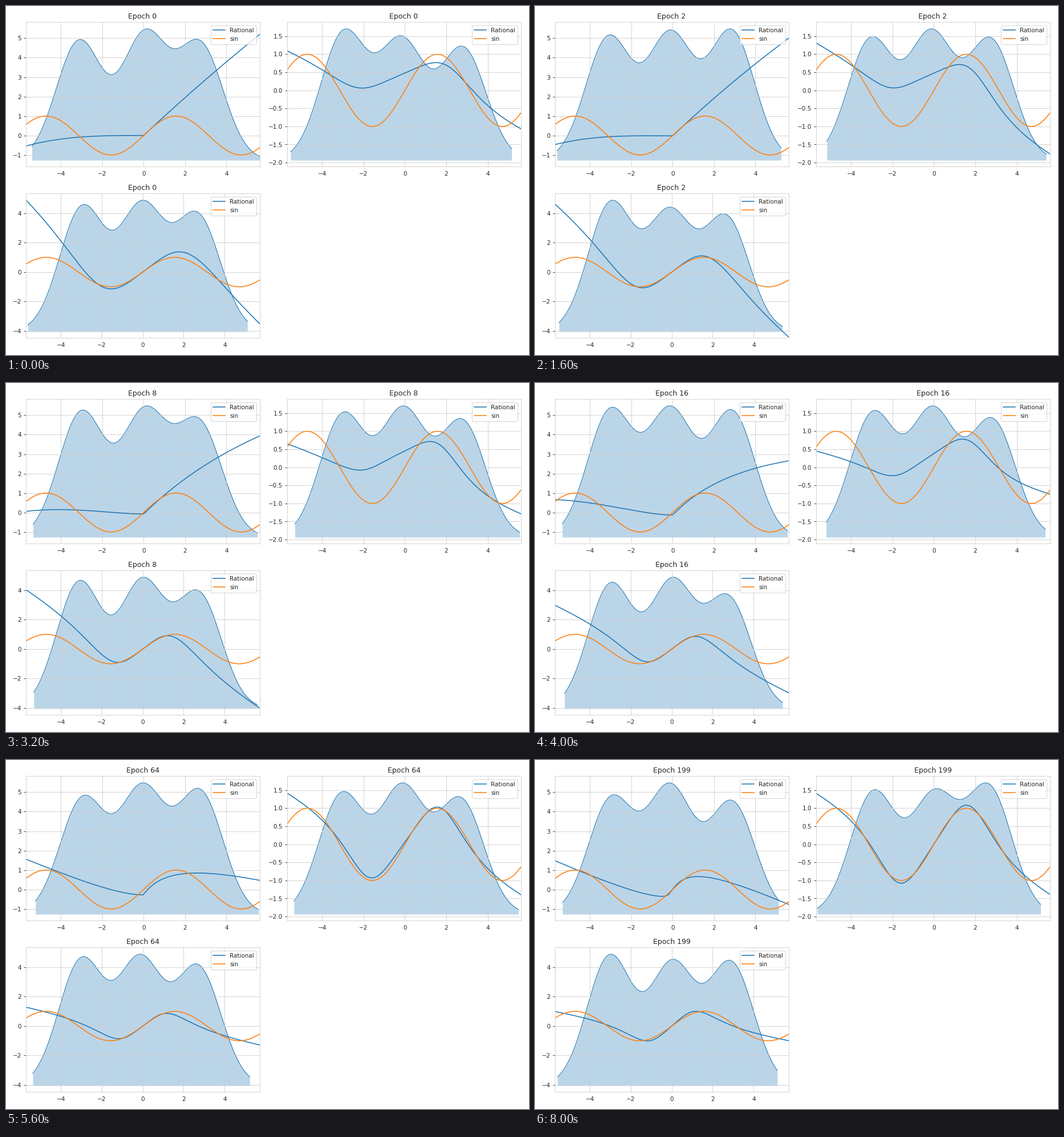
A matplotlib script that plays this animation: 917 by 611 pixels, repeating every 8800 ms.

```python
import numpy as np
import matplotlib.pyplot as plt
from matplotlib.animation import FuncAnimation

W, H, DPI = 917, 611, 75
EPOCHS = [0, 1, 2, 4, 8, 16, 32, 64, 99, 128, 199]
LAST = np.log2(200)
BLUE, ORANGE = "#1f77b4", "#ff7f0e"

plt.rcParams.update({
    "font.family": "DejaVu Sans", "font.size": 10,
    "text.color": ".15", "xtick.color": ".15", "ytick.color": ".15",
    "axes.edgecolor": ".8", "grid.color": ".8", "grid.linewidth": 0.8,
    "axes.grid": True, "axes.axisbelow": True, "xtick.bottom": False,
})


def step(p, mid, width):
    """Smooth rise from 0 to 1 around mid."""
    return 1 / (1 + np.exp((mid - p) / width))


def bump(p, mid, width):
    return np.exp(-((p - mid) / width) ** 2)


def wave(x, centre, far, slope, fall, width, power):
    """Sine-like rational: centre value and slope near 0, a falling line far out."""
    near = centre - far + (slope + fall) * x
    return far - fall * x + near / (1 + np.abs(x / width) ** power)


# Each curve depends on the training progress p = log2(1 + epoch).
def relu_curve(x, p):
    q = (p / LAST) ** 2
    shift = 0.2 * step(p, 6.9, 0.4)
    z = x + shift
    right = (z + np.hypot(z, shift)) / 2
    left = np.maximum(-x, 0)
    y = right / (1 - 0.7 * q + (0.013 + 0.33 * step(p, 4.5, 0.8)) * right)
    y += 0.52 * step(p, 3.6, 0.7) * left**2 / (left + 3)
    y -= 0.003 * step(-p, -5, 0.4) * left**3
    return y - 0.5 * q * right - 0.45 * q


def offset_curve(x, p):
    learnt = step(p, 4.9, 0.6)
    fall = np.interp(p, [0, 1, 2.3, 4.1, 6], [0.22, 0.33, 0.25, 0.12, 0.28])
    return wave(x, 0.48 * (1 - learnt), -0.4 * bump(p, 2.6, 1.6),
                0.25 + 0.65 * learnt, fall, 2.3 + 0.55 * np.exp(-p / 2), 4)


def sine_curve(x, p):
    return wave(x, 0, 0.8 * np.exp(-1.2 * p), 1.05 + 0.2 * step(p, 7, 0.3),
                0.2 + 0.8 * step(-p, -4, 0.8), 1.65 + 1.6 * step(-p, -2, 1.2), 3)


def density(rng):
    """Smoothed histogram of three noisy clusters, scaled to a peak of 1."""
    x = np.linspace(-5.4 + rng.uniform(-.25, .25), 5.25 + rng.uniform(-.3, .4), 300)
    mean = np.array([-3.03, -.05, 2.8]) + rng.uniform(-.12, .12, 3)
    weight = np.array([.96, .95, .92]) + rng.uniform(-.06, .06, 3)
    y = weight @ np.exp(-((x - mean[:, None]) / 1.1) ** 2 / 2)
    return x, y / y.max()


fig = plt.figure(figsize=((W + .01) / DPI, (H + .01) / DPI), dpi=DPI, facecolor="white")


class Panel:
    def __init__(self, seed, left, top, curve, xlim, ylim, yticks):
        box = [left / W, 1 - (top + 253) / H, 410 / W, 253 / H]
        rng = np.random.default_rng(seed)
        self.humps = [density(rng) for _ in EPOCHS]
        self.curve = curve
        self.x = np.linspace(*xlim, 600)

        # The density sits on its own axes, behind the grid.
        self.back = fig.add_axes(box, label=f"back{seed}")
        self.back.axis("off")
        self.back.set(xlim=xlim, ylim=(-0.05, 1.05))
        self.edge, = self.back.plot([], [], color=BLUE, lw=1)
        self.fill = None

        ax = fig.add_axes(box, label=f"front{seed}", facecolor="none")
        self.line, = ax.plot(self.x, 0 * self.x, color=BLUE, lw=1.5, label="Rational")
        ax.plot(self.x, np.sin(self.x), color=ORANGE, lw=1.5, label="sin")
        ax.set_xticks(range(-4, 5, 2))
        ax.set_yticks(yticks)
        ax.set(xlim=xlim, ylim=ylim)
        ax.legend(loc="upper right")
        self.title = ax.set_title("")

    def show(self, i):
        self.line.set_ydata(self.curve(self.x, np.log2(1 + EPOCHS[i])))
        hx, hy = self.humps[i]
        self.edge.set_data(hx, hy)
        if self.fill:
            self.fill.remove()
        self.fill = self.back.fill_between(hx, hy, color=BLUE, alpha=0.3, lw=0)
        self.title.set_text(f"Epoch {EPOCHS[i]}")


panels = [
    Panel(1, 34.5, 28.5, relu_curve, (-5.697, 5.598), (-1.609, 5.82), np.arange(-1, 6)),
    Panel(2, 492.5, 28.5, offset_curve, (-5.697, 5.598), (-2.117, 1.886), np.arange(-2, 2, 0.5)),
    Panel(3, 34.5, 328.5, sine_curve, (-5.716, 5.705), (-4.49, 5.33), np.arange(-4, 5, 2)),
]


def draw(i):
    for panel in panels:
        panel.show(i)
    return []


anim = FuncAnimation(fig, draw, frames=len(EPOCHS), init_func=lambda: draw(0),
                     interval=800, repeat=True, repeat_delay=0, blit=False)
plt.show()
```
